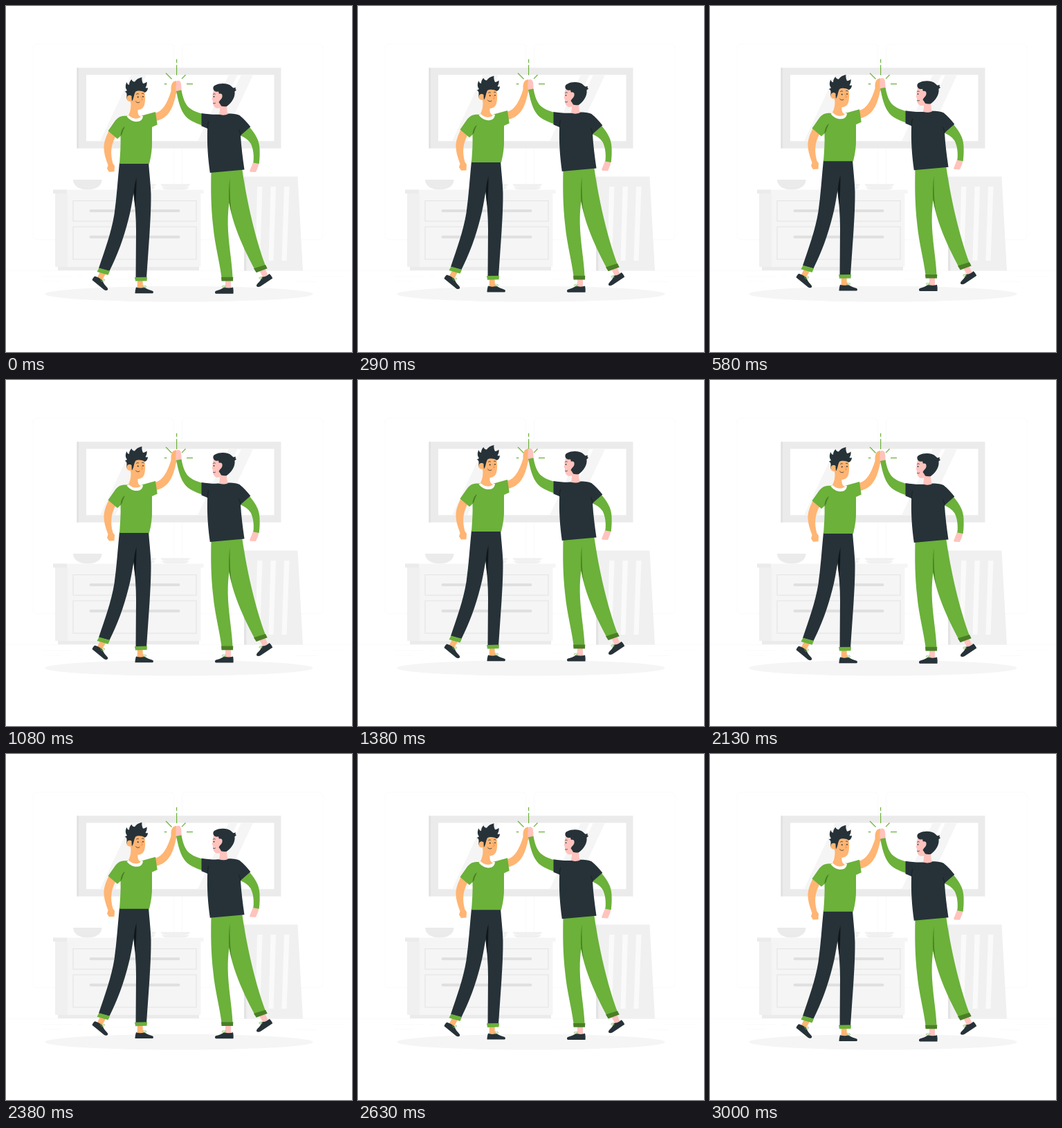
Write an HTML page that moves like this. It is 500 px wide and 500 px high and loops after 3040 ms.

```html
<!DOCTYPE html>
<html lang="en">
<head>
<meta charset="utf-8">
<title>High five</title>
<style>
  html, body { margin: 0; width: 100%; height: 100%; overflow: hidden; background: #fff; }
  svg { display: block; width: 100%; height: 100%; }
  .green { fill: #6bb13a; }
  .shade { fill: #4a7f26; }
  .dark { fill: #263238; }
  .tan { fill: #ffb573; }
  .pink { fill: #ffc3bd; }
  .line { fill: none; stroke-linecap: round; stroke-linejoin: round; }
</style>
</head>
<body>
<svg viewBox="0 0 500 500">
  <!-- wall and floor -->
  <g fill="none" stroke="#ebebeb" stroke-width=".25">
    <rect x="39.2" y="55" width="203.5" height="282.8" rx="5.7"/>
    <rect x="254.5" y="55" width="203.5" height="282.8" rx="5.7"/>
    <path d="M0 382.4H500M417 398.5h33M322 401.2h9M440 391h50M52 390.9h43M104 390.9h7M131 395h94M53 398h28M281 395h20"/>
  </g>

  <!-- mirror -->
  <path fill="#ebebeb" d="M103 89.300H397.500V205.700H103z"/>
  <path fill="#e0e0e0" d="M102.300 89.300h2.700V205.700h-2.700z"/>
  <path fill="#fff" d="M116 99.500H387.500V195.300H116z"/>
  <path fill="#f5f5f5" d="M181 99.500h22L158 195.300h-22zM322 99.500h12.500L289.500 195.300h-12.500zM340 99.500h17L312 195.300h-17z"/>

  <!-- tableware -->
  <path fill="#ebebeb" d="M97 251h41.500c0 9-9 14.500-20.700 14.500S97 260 97 251z"/>
  <g id="plate" fill="#f0f0f0">
    <path d="M223.500 257.300h42.500c0 3-5 4-12 4.500h-18c-8-.5-12.500-1.500-12.500-4.500z"/>
    <path d="M225 261.500h39.500c-1 3-6 4-12 4h-16c-6 0-10.500-1-11.500-4z"/>
  </g>
  <use href="#plate" x="-49"/>

  <!-- cabinet -->
  <path fill="#ebebeb" d="M75 376H279V382H75z"/>
  <path fill="#f5f5f5" d="M89 270H281.500V377H89z"/>
  <path fill="#f0f0f0" d="M71 270H89V377H71z"/>
  <path fill="#f5f5f5" d="M68 265.500H285.500V271H68z"/>
  <path fill="#ebebeb" d="M68 265.500H88V271H68z"/>
  <path fill="none" stroke="#e4e4e4" stroke-width="1.200" d="M97 281.500H275V311H97zM97 319H275V366H97z"/>
  <path class="line" stroke="#e0e0e0" stroke-width="4" d="M122.500 296H249.500M122.500 333.700H249.500"/>

  <!-- leaning panel -->
  <path fill="#f0f0f0" d="M345 246.500H421.500L429 382.400H345z"/>
  <path fill="#e4e4e4" d="M344 246.500h1.500L347.500 382.400H344z"/>
  <path fill="#fafafa" d="M363 261h7.500L367 368h-6.500zM382.500 261h7.500L386.500 368h-7zM402 261h7.500L405.500 368h-7z"/>

  <ellipse cx="250" cy="416.200" rx="193.700" ry="11.300" fill="#f5f5f5"/>
  <path fill="none" stroke="#6bb13a" stroke-width="1.200" d="M246.600 77v5M246.600 85.300V100M231 97l8.500 8.500M259.500 99.500L254 105.200M228.700 112.700h3.600M261 112.700h9"/>

  <g id="pair">
    <!-- left friend: legs -->
    <path class="tan" d="M136 384l8 3-5 9-7-4zM190 396h7.500l.5 12h-8.500z"/>
    <path class="dark" d="M128.500 390.500c-2 1-3.500 3.500-4 5.500L141 409.500c2 1.800 5 2 6 .5.800-1.500-.5-3-2-4.500-3-3-4.500-6-6-9.500-2-1-4.500-3.500-6.500-4zM188 406.500c-1 3-1.500 6-1.500 8.800H212c1.300-1 1.300-2.800-.2-3.500-4-1.200-8-2.700-12-5.300-3 1.500-8 1.500-11.800 0z"/>
    <path class="line" stroke="#6bb13a" stroke-width=".7" d="M138.500 398c1-3 3.500-4 4-2.500s-2 2.500-4 2.500c-2-1-2.500-4-1-4.500M198.500 407c1-3 4-3.500 4-1.500 0 1.500-2.500 1.700-4 1.500-1-1.500-.5-3.500.5-3.500"/>
    <path class="dark" d="M164 226H206C207 241 209 256 209.500 272C209.700 292 208.500 312 207.500 328L203 393H187.500L188 325C188 306 186.500 288 184.500 270C182 284 180 297 177 308C170 336 161 360 149.500 383L134 379C143 352 152 328 156.500 301C160 276 161.500 251 164 226z"/>
    <path fill="#10171a" d="M188.500 248c-2 7-3.500 15-4 24l2 19c1.500-14 2-28 2-43z"/>
    <path class="green" d="M134.500 378.500l15.500 4.500-2.500 5.700-16-4.700zM186 392l18-.3-.5 5.500-16.500.4z"/>

    <!-- left friend: arms -->
    <path class="tan" d="M150 178C144 189 141 198 141.500 206C142 216 145.500 224 147.500 230L146 235L149 239.700L156.500 239.300L157 231L154.500 227.500C150.500 213 151.500 202 158 189z"/>
    <path class="tan" d="M215 155C227 152 233 140 238.500 123L238.500 119C238.500 115 240 110 243 109L246 108L248.500 121C247 124 246 126 245.500 128C241 150 233.500 162 217.500 166z"/>
    <path class="green" d="M175 158.700C167 158.500 163 159.500 158 165.500L147.500 180.500L161 192L165.500 188C166 201 165 214 164 228H207C210 216 211.300 206 211 196V175L218.700 171.500L216 153L198 158z"/>
    <path class="shade" d="M172 174c-4 2-6 7-6.500 14l2.200-3c1-4 2.500-7.500 4.300-11z"/>

    <!-- left friend: head -->
    <path fill="#fff" d="M174.500 159.500c4 5 9 8 15 7.600 5-.4 8-3 8.500-8.100l-4-1.500-16 .5z"/>
    <path class="tan" d="M180.500 138c0 8 0 13-3.500 19.500 4 5 13 7.500 18 2.500-3-1-5-4-4.500-10z"/>
    <path class="tan" d="M182 122c6-3 16-2 18 2 1.500 6 1.500 13 0 19-1.500 5-6 7.500-11 7-5-.7-8-6-9-12-4 0-6.500-3-6-6 .3-3 4-5 6.500-3z"/>
    <path class="dark" d="M181.500 137L180.500 130C178 128 175.500 130 174.500 134V127C174 125 173 124 171.500 124C173 123.500 174 122.500 175 122C172.500 119 172 115 174.500 110C175 112.500 176 113.500 178 114C178 111 179 108 181.500 106C182 108 183.500 109.500 186 109.500C188 106 192 104 196.500 103C196 106 196.500 109 198 112C200 112 202 111 203.500 109.500C204 113 203 116 201.500 118C203 119 204 118.500 205 118C205 121 203.500 124 200.500 125C196 122 190 122 187 124C184.500 128 185 133 182.500 137z"/>
    <path class="tan" d="M181.500 130c-3-2-7-.5-6.800 3 .2 4 4 5.500 7 4z"/>
    <g class="line" stroke="#263238" stroke-width=".8">
      <path d="M188.500 127.500c1-1 2-1 3-.5M196.500 126.500c1-.5 2-.3 2.800.5M187.500 138c1.500 2 4 2.300 5.500 1"/>
      <path stroke="#ed893e" d="M195 131c1 1.500 2 3 2.300 4.500l-2 .5"/>
    </g>
    <g class="dark"><circle cx="190.700" cy="131.500" r="1"/><circle cx="198" cy="131" r=".9"/></g>

    <!-- right friend: legs -->
    <path class="pink" d="M317 396h8v12h-8zM366 382l8-3 4.500 9.500-7 4z"/>
    <path class="dark" d="M328 406.500c.7 3 .9 6 .5 9.200H303c-1.500-1.200-1.300-3.200.3-4 4-1 8-2.500 12-5.200 4 1.500 9 1.500 12.700 0zM380.500 387c2 1.500 4 4 4.700 6.500L368 405c-2 1.200-4.500 1.500-5.700.3-.8-1.300 0-3 1.500-4.500 3-2.500 5-6 6.500-9.300 4 0 7.700-2 10.200-4.500z"/>
    <path class="line" stroke="#6bb13a" stroke-width=".7" d="M316.500 407c-1-3-4-3.500-4-1.500 0 1.500 2.500 1.700 4 1.500 1-1.500.5-3.500-.5-3.500M370 394c-2-2.500-4.500-2.500-4-.7.300 1.500 2.500 1.300 4 .7.500-1.700-.5-3.500-1.500-3"/>
    <path class="green" d="M296.500 238L341 234C345 261 349 282 355 308C361 333 367 354 375 375.500L359.500 381C349 361 340 343 332.500 322C328 309 325 299 322.500 284C320.500 298 320.300 311 321 325C322.500 350 326.500 370 327.500 392H311.500C308 366 302 346 299.500 320C296 290 296 265 296.500 238z"/>
    <path class="shade" d="M323.500 249c-1.500 12-2 24-1 36l3.700 16c-2.500-16-3-34-2.700-52zM311 391.700h17.300l-.3 5.700h-16.500zM358 379.300L375 374l2.700 5.300-16 5.900z"/>

    <!-- right friend: arms -->
    <path class="pink" d="M245.800 124c-.8-5-.8-11 .7-15.500 2.500-1.500 5-.2 6.200 2.500.8 4 .8 8 .8 12.500zM357.500 224l-1.500 4.500-4 10 1.200 1.300 7.800.3 3.500-8.300 1.300-7.500z"/>
    <path class="green" d="M246 123L253.500 121.500C255.500 132 258 140 263.500 146C269 151 275.500 153.500 284 156V172.500C273 169 263 165 257 156C250.500 146 248.500 134 246 123zM338 187l14-12c9 11 14 19 14.500 31 .3 8 .2 14-.8 22l-8.200-1.500c1-11 0-20-4-28-4-6-9-9-15.500-11.500z"/>
    <path class="dark" d="M282.500 155c9 1.500 17 2 25 1.700l12-1.200c8 0 14 .5 18 2.500 6 5 11 10 15.800 16.500L339 187c1 17 3 32 5.500 49.500L294.800 241c-3-22-4.500-42-3.700-64l-8.600-3.500z"/>
    <path class="line" stroke="#10171a" stroke-width=".7" d="M291.300 177c.2-4 .5-7 1.200-10M339 187c-.5-3-1-5-2.500-8"/>

    <!-- right friend: head -->
    <path class="pink" d="M308.500 141c.8 6 .8 10-.5 15.500 4 1.700 9 1.500 13-.5-2-4-2-8-1.500-14z"/>
    <path class="pink" d="M300.500 121c-2 4-2 8-2 11l-1 3.200 1.300.8c0 5 .7 9 4.200 11.300 4 1.500 8 0 10-4.300V121z"/>
    <path class="dark" d="M301 122.500C298 119.500 299.500 115 303 114.300C309 111 321 111 326 116.300L328.500 118.500L332 117.800L331.500 120L333 121.500L330.500 123.500C331.500 132 326 140 319 145C316 145.500 313 145.300 311 144.500C310 142.500 308.500 140.500 307.500 139L310 135L307 123.500C305 124 302.500 123.800 301 122.500z"/>
    <path class="pink" d="M312 127.500c-2.500-2-6-1-6.500 3-.3 4 2 7 4.500 5 2-1.500 3.500-5 2-8z"/>
    <g class="line" stroke="#263238" stroke-width=".8">
      <path d="M299.500 127.500c1-.8 2-.8 2.800-.2M299.500 140.500c1 .7 2 .5 3-.2"/>
    </g>
    <circle class="dark" cx="300.500" cy="131" r=".9"/>
  </g>
</svg>
<script>
  const LOOP = 3040, RISE = 10;
  const pair = document.getElementById("pair");

  // Constant speed up for half the loop, then back down.
  function draw() {
    const phase = performance.now() % LOOP / LOOP;
    const lift = RISE * (1 - Math.abs(1 - 2 * phase));
    pair.setAttribute("transform", `translate(0 ${-lift})`);
    requestAnimationFrame(draw);
  }
  draw();
</script>
</body>
</html>
```
